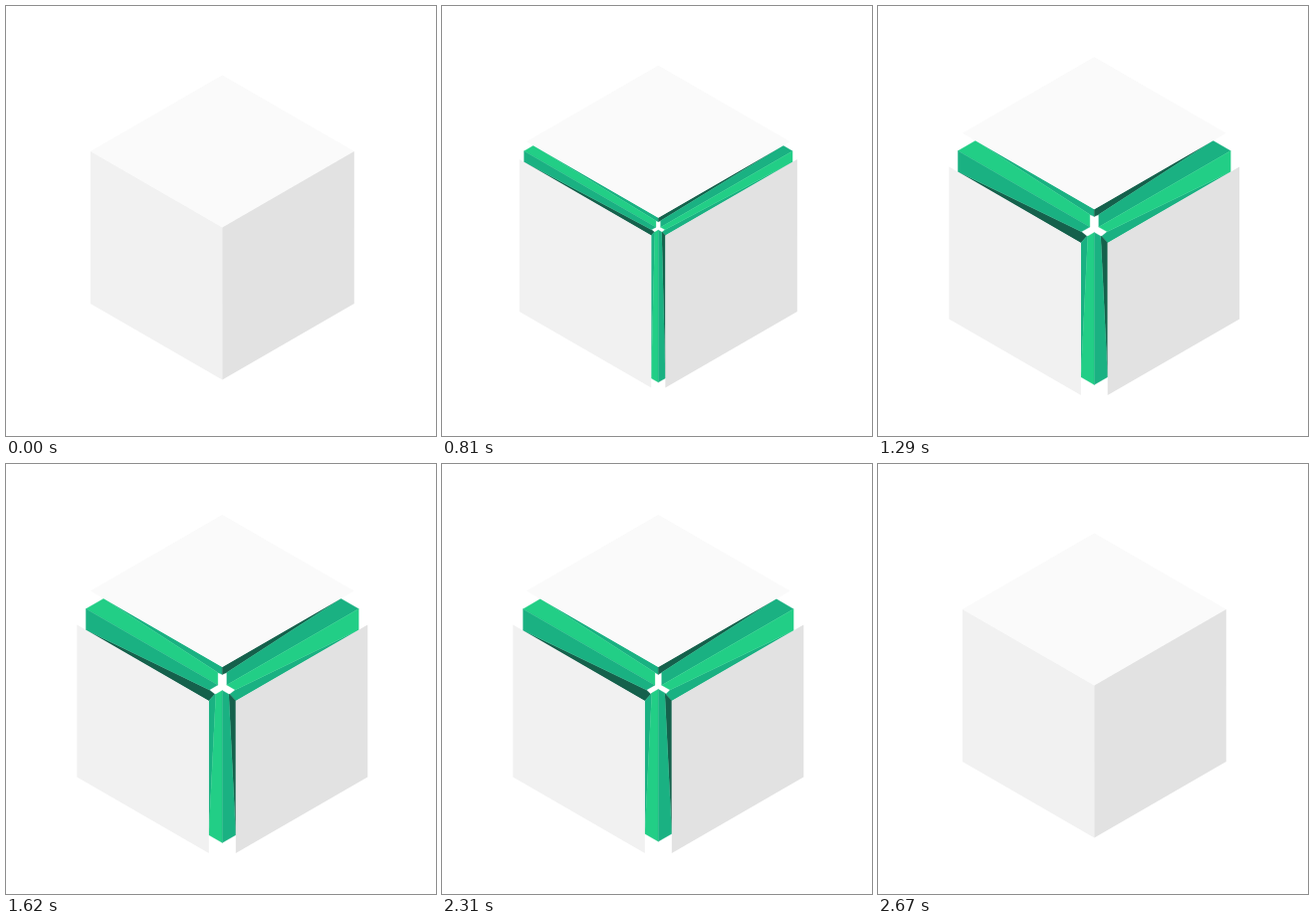
Recreate the animation shown at these times as an HTML page. Size 432x432 px, loop 5.67 s.

```html
<!DOCTYPE html>
<html lang="en">
<head>
<meta charset="utf-8">
<title>Opening cube</title>
<style>
  html, body { margin: 0; width: 100%; height: 100%; overflow: hidden; background: #fff; }
  svg { display: block; width: 100%; height: 100%; }
</style>
</head>
<body>
<svg id="stage" viewBox="0 0 432 432"><g id="cube" transform="translate(217.3 222.5)"></g></svg>
<script>
const LOOP = 5670, STEP = 30;
const HALF = 132.5, RISE = 76.5, EDGE = 153, SLOPE = RISE / HALF;
const LIGHT = '#22ce86', MID = '#1ab182', DARK = '#15614c';
const cube = document.getElementById('cube');

function addShape(fill, parent, seam) {
  const el = document.createElementNS('http://www.w3.org/2000/svg', 'polygon');
  el.setAttribute('fill', fill);
  if (seam) {
    el.setAttribute('stroke', fill);
    el.setAttribute('stroke-width', 0.3);
    el.setAttribute('stroke-linejoin', 'round');
  }
  parent.appendChild(el);
  return points => el.setAttribute('points', points.map(p => p.map(v => v.toFixed(2)).join()).join(' '));
}

const rods = cube.appendChild(document.createElementNS('http://www.w3.org/2000/svg', 'g'));
const rod = (...fills) => fills.map(fill => addShape(fill, rods, true));

// wedge, face, face, wedge for each rod
const leftRod = rod(MID, DARK, LIGHT, MID);
const rightRod = rod(DARK, MID, MID, LIGHT);
const midRod = rod(MID, DARK, LIGHT, MID);
const topPlate = addShape('#fafafa', cube);
const leftPlate = addShape('#f1f1f1', cube);
const rightPlate = addShape('#e2e2e2', cube);

// cubic-bezier(.25, .1, .25, 1)
function ease(x) {
  if (x <= 0) return 0;
  if (x >= 1) return 1;
  const curve = (a, b, u) => 3 * a * u * (1 - u) ** 2 + 3 * b * u * u * (1 - u) + u ** 3;
  let lo = 0, hi = 1;
  for (let i = 0; i < 24; i++) {
    const u = (lo + hi) / 2;
    if (curve(0.25, 0.25, u) < x) lo = u; else hi = u;
  }
  return curve(0.1, 1, lo);
}

function drawSideRod([upperWedge, lowerWedge, upper, lower], s, open, out) {
  const reach = HALF + 4.5 * out;
  const endY = -RISE - 0.5 * out;
  const cut = (18.5 * open + (4.5 * SLOPE - 0.5) * out) / (2 * SLOPE);
  const inner = [s * 4.5 * out, -0.5 * out];
  const outer = [s * reach, endY];
  const upperOuter = [s * (reach - cut), endY - SLOPE * cut];
  const lowerOuter = [s * reach, 15.5 * open - SLOPE * (reach - 13.5 * open)];
  const upperInner = [inner[0], -13 * open];
  const lowerInner = [inner[0] + s * 8.5 * open, inner[1] + 4.9 * open];
  upper([inner, outer, upperOuter, upperInner]);
  lower([inner, outer, lowerOuter, lowerInner]);
  upperWedge([upperOuter, upperInner, [0, -11 * open], [0, -18.5 * open]]);
  lowerWedge([lowerOuter, lowerInner, [s * 7.5 * open, 8.8 * open], [s * 13.5 * open, 15.5 * open]]);
}

function drawMidRod(shapes, open, out) {
  const y = 5 * out;
  [-1, 1].forEach((s, i) => {
    const wide = 13.5 * open;
    const wingOuter = [s * wide, y + EDGE - SLOPE * wide];
    const wingInner = [s * 6.5 * open, y + 3.75 * open];
    shapes[i]([wingOuter, wingInner, [s * 7.5 * open, 8.8 * open], [s * wide, 15.5 * open]]);
    shapes[i + 2]([[0, y], [0, y + EDGE], wingOuter, wingInner]);
  });
}

function drawPlates(open) {
  const lift = -18.5 * open;
  topPlate([[0, lift], [HALF, lift - RISE], [0, lift - EDGE], [-HALF, lift - RISE]]);
  [leftPlate, rightPlate].forEach((plate, i) => {
    const s = i ? 1 : -1, x = s * 13.5 * open, y = 15.5 * open;
    plate([[x, y], [x + s * HALF, y - RISE], [x + s * HALF, y + EDGE - RISE], [x, y + EDGE]]);
  });
}

function render(ms) {
  const opening = ease((ms - 560) / 820);
  const open = Math.min(opening, ease((2670 - ms) / 350));
  const out = Math.min(opening, ease((2670 - ms) / 800));
  rods.setAttribute('visibility', open > 0 ? 'visible' : 'hidden');
  drawSideRod(leftRod, -1, open, out);
  drawSideRod(rightRod, 1, open, out);
  drawMidRod(midRod, open, out);
  drawPlates(open);
}

const start = performance.now();
function tick() {
  const ms = (performance.now() - start) % LOOP;
  render(ms - ms % STEP);
  requestAnimationFrame(tick);
}
tick();
</script>
</body>
</html>
```
